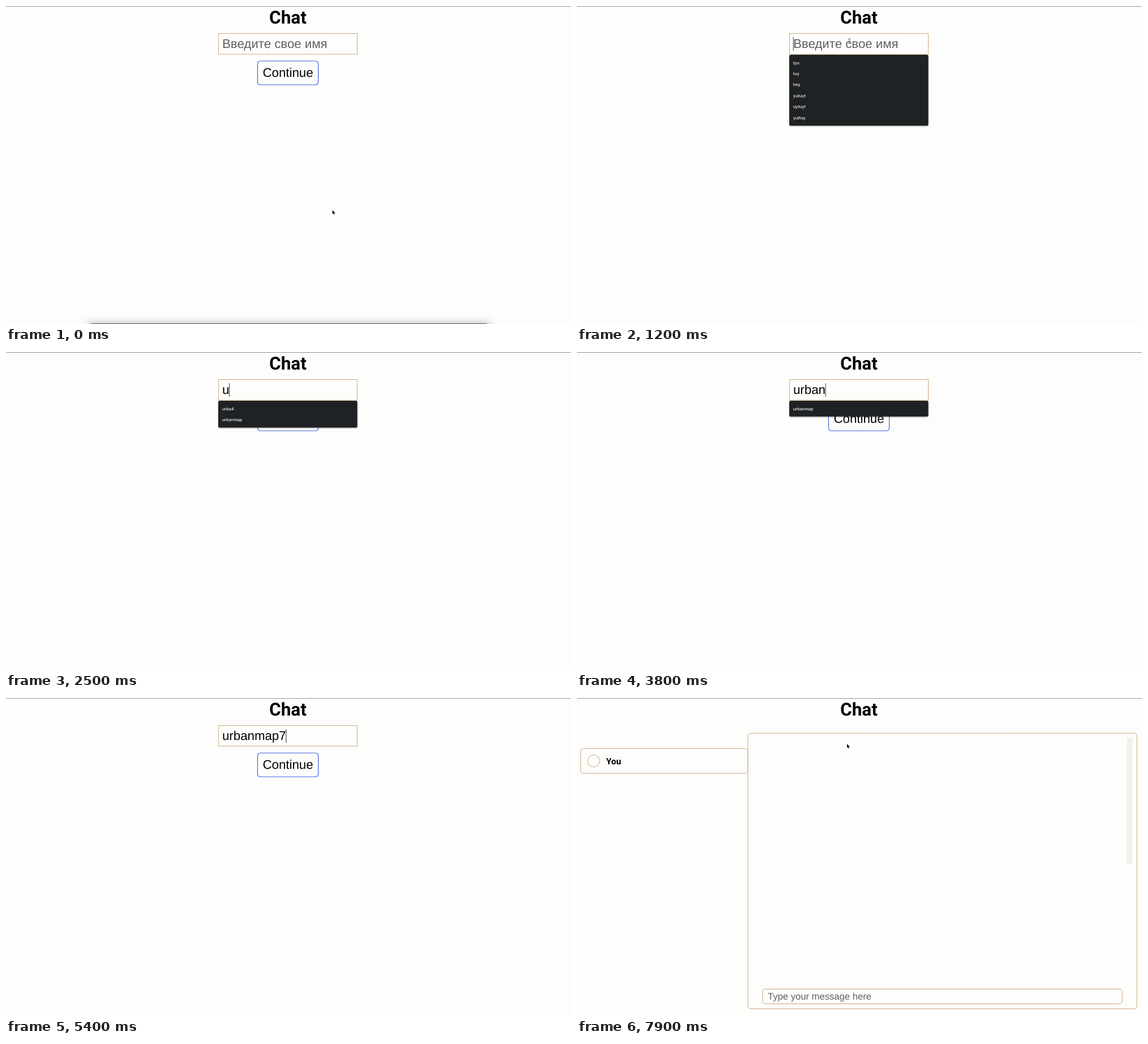
An HTML page for the animation above (8 s loop, 998 px wide and 561 px high).

```html
<!DOCTYPE html>
<html lang="en">
<head>
<meta charset="utf-8">
<title>Chat</title>
<style>
  html, body { margin: 0; width: 100%; height: 100%; overflow: hidden; background: #fdfdfc; }
  svg { display: block; width: 100%; height: 100%; font-family: "Liberation Sans", Arial, sans-serif; text-rendering: geometricPrecision; }
  .frame { fill: none; stroke: #cba572; }
  .field { font-size: 22.25px; }
  .hint { fill: #606060; }
  .bold { font-family: Roboto, Arial, sans-serif; font-weight: 700; }
  #list text { font: 500 7.3px Inter, sans-serif; fill: #f4f4f4; }
  #panel { fill: #1f2225; filter: drop-shadow(0 1px 1px rgba(0, 0, 0, .45)); }
</style>
</head>
<body>
<svg viewBox="0 0 998 561">
  <defs>
    <filter id="blur" x="-10%" y="-200%" width="120%" height="500%">
      <feGaussianBlur stdDeviation="8"/>
    </filter>
  </defs>
  <rect width="998" height="561" fill="#fdfdfc"/>
  <rect width="998" height="1" fill="#92928d"/>
  <text class="bold" x="498" y="30.7" font-size="31.5" text-anchor="middle">Chat</text>

  <g id="login">
    <rect class="frame" x="375.5" y="48.5" width="245" height="36.5" style="stroke:#cdac78"/>
    <text class="field hint" id="hint" x="382" y="74.3">Введите свое имя</text>
    <text class="field" id="typed" x="382" y="74.3"></text>
    <rect id="caret" y="55" width="1" height="24" fill="#333"/>
    <rect x="444.4" y="97" width="107.2" height="42" rx="5" fill="none" stroke="#4060de" stroke-width="1.2"/>
    <text class="field" x="498" y="125.4" text-anchor="middle">Continue</text>
    <g id="list">
      <rect id="panel" x="375" y="86" width="245.5" rx="2.5"/>
      <g id="rows"></g>
    </g>
  </g>

  <g id="room">
    <rect class="frame" x="6.5" y="89" width="295" height="44" rx="5"/>
    <circle class="frame" cx="29.5" cy="111" r="10.7"/>
    <text class="bold" x="51.5" y="116.8" font-size="15.3">You</text>
    <rect class="frame" x="301.8" y="62.2" width="687.2" height="486" rx="5" style="fill:#fdfdfc"/>
    <rect x="971" y="70" width="10" height="222" fill="#f2f2ed"/>
    <rect class="frame" x="327.8" y="513.5" width="635.2" height="26" rx="5"/>
    <text class="hint" x="337" y="532" font-size="16.64">Type your message here</text>
  </g>

  <g id="dock">
    <rect x="143" y="560" width="714" height="40" rx="6" fill="#000" opacity=".3" filter="url(#blur)"/>
    <rect x="147" y="560" width="706" height="40" rx="6" fill="#5c5c4a"/>
  </g>
  <path id="arrow" d="M0 0V7.2L1.7 5.7L2.8 8L3.9 7.5L2.8 5.3H4.9Z" stroke="#fff" stroke-width=".6" paint-order="stroke"/>
  <path id="beam" d="M-2 -4.5Q0 -4.5 0 -3Q0 -4.5 2 -4.5M0 -3V3M-2 4.5Q0 4.5 0 3Q0 4.5 2 4.5" fill="none" stroke="#444" stroke-width=".9"/>
</svg>
<script>
  const LOOP = 8000, STEP = 100;
  const NAME = "urbanmap7";
  const KEY_TIMES = [2100, 2600, 3000, 3100, 3800, 3900, 4000, 4200, 4500];
  const RECENT = ["tyu", "tuy", "hey", "yutuyt", "uytuyt", "yuttuy"];
  const MATCHES = ["urba4", "urbanmap"];
  const el = {};
  document.querySelectorAll("[id]").forEach(node => el[node.id] = node);

  const show = (node, on) => node.style.display = on ? "" : "none";
  const place = (node, x, y) => node.setAttribute("transform", `translate(${x} ${y})`);
  const clamp = v => Math.min(1, Math.max(0, v));
  const mix = (a, b, k) => a + (b - a) * k;
  const smooth = k => k * k * (3 - 2 * k);

  function suggestions(t, typed) {
    if (t < 1200 || typed.length >= 8) return [];
    if (!typed) return RECENT;
    return MATCHES.filter(word => word.startsWith(typed));
  }

  function drawList(words) {
    show(el.list, words.length);
    el.panel.setAttribute("height", 8.4 + 19.42 * words.length);
    el.rows.innerHTML = words.map((word, i) =>
      `<text x="381.7" y="${102.6 + 19.42 * i}">${word}</text>`).join("");
  }

  function drawPointer(t) {
    const k = smooth(clamp(t / 900));
    const drift = smooth(clamp((t - 1200) / 800));
    const x = mix(576.7, 481, k), y = mix(360, 62, k);
    const inField = y < 85;
    show(el.beam, inField && t < 2100);
    show(el.arrow, !inField || t >= 7800);
    place(el.beam, mix(x, 478, drift), mix(y, 75, drift));
    if (t >= 7800) place(el.arrow, 477, t < 7900 ? 75 : 81);
    else place(el.arrow, x, y);
  }

  function draw(t) {
    const typed = NAME.slice(0, KEY_TIMES.filter(time => time <= t).length);
    const inRoom = t >= 5500;
    show(el.login, !inRoom);
    show(el.room, inRoom);
    show(el.dock, t < 500);
    place(el.dock, 0, 30 * clamp(t / 500));
    show(el.hint, !typed);
    el.typed.textContent = typed;
    show(el.caret, t >= 1200);
    if (!inRoom) {
      el.caret.setAttribute("x", 381.7 + (typed ? el.typed.getComputedTextLength() : 0));
      drawList(suggestions(t, typed));
    }
    drawPointer(t);
  }

  const start = performance.now();
  function tick() {
    const t = (performance.now() - start) % LOOP;
    draw(Math.floor(t / STEP) * STEP);
    requestAnimationFrame(tick);
  }
  tick();
</script>
</body>
</html>
```
